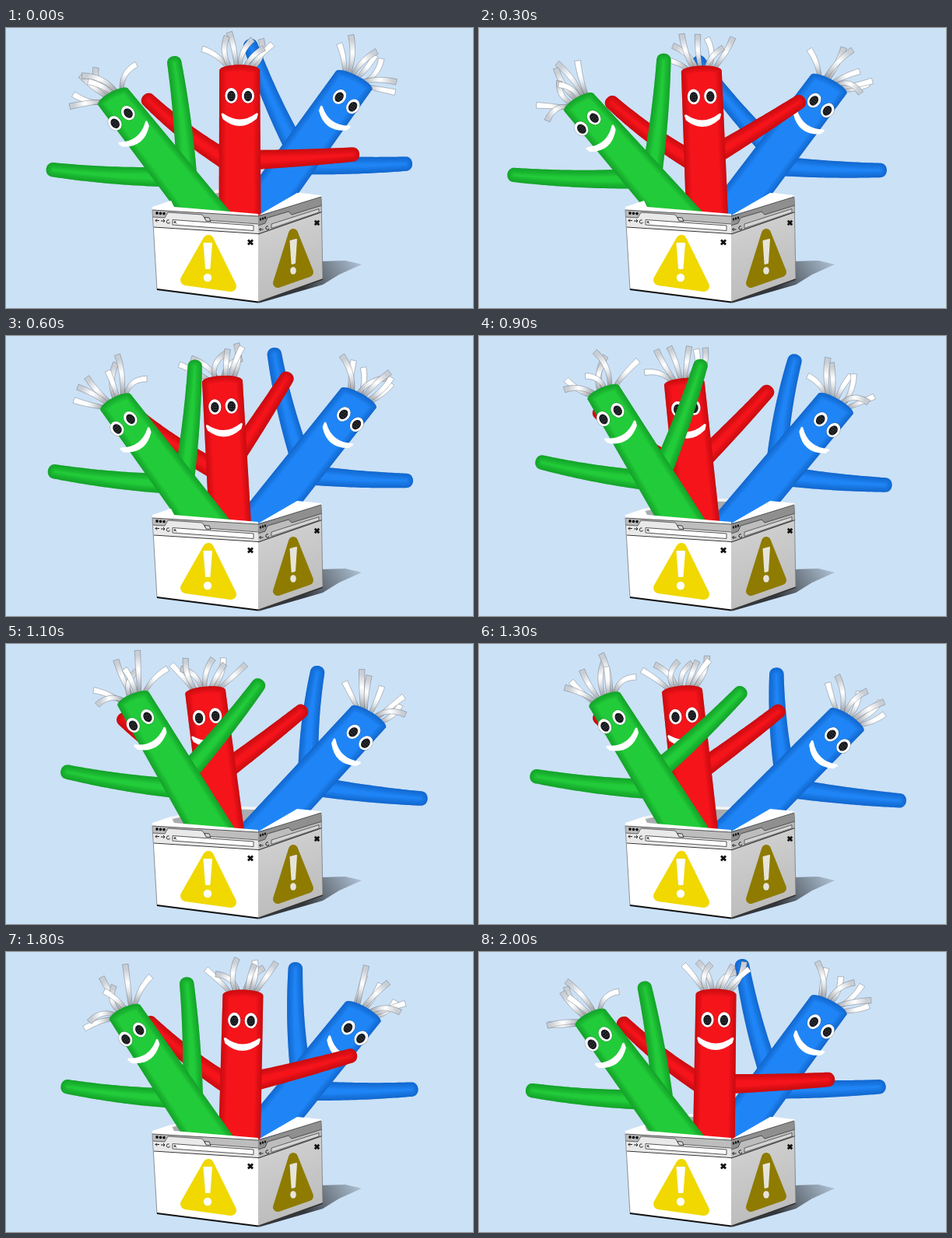
An HTML page with a canvas for the animation above (2100 ms loop, 600 px wide and 360 px high).

```html
<!DOCTYPE html>
<html lang="en">
<head>
<meta charset="utf-8">
<title>Tube dancers in a browser box</title>
<style>
  html, body { margin: 0; width: 100%; height: 100%; overflow: hidden; background: #cbe1f6; }
  canvas { display: block; }
</style>
</head>
<body>
<canvas id="stage" width="600" height="360"></canvas>
<script>
const ctx = document.getElementById('stage').getContext('2d');
const LOOP = 2100, STEP = 100, FLOOR = 240;
const { sin, cos, PI } = Math;
const rad = deg => deg * PI / 180;
const mix = (a, b, t) => a + (b - a) * t;

// A swing that repeats once per loop, plus an overtone
const wave = (mid, c1 = 0, s1 = 0, c2 = 0, s2 = 0) => q =>
  mid + c1 * cos(q) + s1 * sin(q) + c2 * cos(2 * q) + s2 * sin(2 * q);

// Angles are degrees clockwise from straight up.
// Arms: joint is the height along the body, side the offset from its middle,
// slide lifts the joint as the arm lowers.
const blue = {
  color: '#1f85f6', dark: '#07419c', headW: 26, baseW: 27, seed: 5,
  base: wave(327, -4, -2), height: wave(208, 7), lean: wave(39.7, -3.1, -2.6, -1, 1),
  arms: [
    { joint: 100, side: -14, bend: -3, angle: wave(-10.5, -15.7, -9.2, 3, -11.6), reach: wave(139, 9, 5) },
    { joint: 80, side: 0, bend: 2, angle: wave(93, -3.3, 0.3, 0, 1.4), reach: wave(154, -1.5, -5, 0, 4) }]
};
const red = {
  color: '#f6141b', dark: '#8e0008', headW: 26, baseW: 27, seed: 31,
  base: wave(290, 10.5, -1, 0, -2.8), height: wave(185, 3), lean: wave(-2.8, 3.5, -0.8, -0.8, -1.2),
  arms: [
    { joint: 60, side: 0, bend: -5, angle: wave(-54, 1, -1.5), reach: wave(155) },
    { joint: 70, side: 0, bend: 1, angle: wave(58, 18, -11, 11), reach: wave(150, 4, -2) }]
};
const green = {
  color: '#22cb39', dark: '#08701a', headW: 22, baseW: 27, seed: 72,
  base: wave(260.5, -3.3, -4.4), height: wave(197, -2, -2), lean: wave(-35, -3.8, -2.8, 0.6, -1.5),
  arms: [
    { joint: 62, side: 0, bend: -3, angle: wave(-84.3, -2.7, -0.6, 0.5, -1.8), reach: wave(166, 2.5, 3.8, -1, 7.3) },
    { joint: 62, side: 14, bend: 2, slide: 0.5, angle: wave(14, -20.5, -8.6, 0, 11.5), reach: wave(150) }]
};

const random = n => {
  const x = sin(n * 12.9898) * 43758.5453;
  return x - Math.floor(x);
};

// Step from a point: along an angle and to its right
function move(p, deg, far, side = 0) {
  const a = rad(deg);
  return [p[0] + sin(a) * far + cos(a) * side, p[1] - cos(a) * far + sin(a) * side];
}

function trace(points) {
  ctx.beginPath();
  points.forEach(p => ctx.lineTo(p[0], p[1]));
}

function stroke(color, width) {
  ctx.strokeStyle = color;
  ctx.lineWidth = width;
  ctx.stroke();
}

function poly(points, fill, edge, width = 1) {
  trace(points);
  ctx.closePath();
  ctx.fillStyle = fill;
  ctx.fill();
  if (edge) stroke(edge, width);
}

function line(points, color, width) {
  trace(points);
  stroke(color, width);
}

function oval(x, y, rx, ry, fill) {
  ctx.beginPath();
  ctx.ellipse(x, y, rx, ry, 0, 0, 7);
  ctx.fillStyle = fill;
  ctx.fill();
}

// Outline of a band along a quadratic curve; width depends on the way along it
function band(a, c, b, width, steps) {
  const left = [], right = [];
  for (let i = 0; i <= steps; i++) {
    const s = (i / steps) ** 1.6;
    const at = k => mix(mix(a[k], c[k], s), mix(c[k], b[k], s), s);
    const dx = mix(c[0] - a[0], b[0] - c[0], s), dy = mix(c[1] - a[1], b[1] - c[1], s);
    const w = width(s) / (Math.hypot(dx, dy) || 1);
    left.push([at(0) - dy * w, at(1) + dx * w]);
    right.unshift([at(0) + dy * w, at(1) - dx * w]);
  }
  return left.concat(right);
}

// Fill the current path and darken it softly toward its edges
function inflate(fig) {
  ctx.save();
  ctx.fillStyle = fig.color;
  ctx.fill();
  ctx.clip();
  ctx.globalAlpha = 0.09;
  for (let w = 2; w < 18; w += 3) stroke(fig.dark, w);
  ctx.restore();
}

function drawArm(fig, arm, foot, lean, q) {
  const angle = arm.angle(q), reach = arm.reach(q);
  const joint = move(foot, lean, arm.joint + (arm.slide || 0) * angle, arm.side);
  const tip = move(joint, angle, reach);
  const width = s => {
    const d = Math.min(1, s * reach / 9);
    return mix(9, 13, s) * Math.sqrt(1 - (1 - d) ** 2.4);
  };
  trace(band(tip, move(joint, angle, reach / 2, 2 * arm.bend), joint, width, 40));
  ctx.closePath();
  inflate(fig);
}

function drawBody(fig, foot, head, lean) {
  const tilt = lean * 0.75, flare = fig.baseW / cos(rad(lean));
  const corner = (side, up) => move(head, tilt, up, side * fig.headW);
  const low = move(foot, lean, -10);
  ctx.beginPath();
  ctx.moveTo(low[0] - flare, low[1]);
  ctx.lineTo(...corner(-1, -2));
  ctx.bezierCurveTo(...corner(-0.9, 7), ...corner(0.9, 7), ...corner(1, -2));
  ctx.lineTo(low[0] + flare, low[1]);
  ctx.closePath();
  inflate(fig);
}

function drawHair(fig, head, lean, q) {
  const count = 7;
  for (let k = 0; k < count; k++) {
    const i = k * 3 % count, slot = i - (count - 1) / 2;
    const rnd = n => random(fig.seed + i * 7 + n);
    const angle = lean + 14 * slot + lean * 0.4 * cos(q) + 12 * sin(2 * q + 6 * rnd(1));
    const len = 36 + 18 * rnd(2);
    const curl = (rnd(3) - 0.5) * 110 + 35 * sin(3 * q + 6 * rnd(4));
    const root = move(head, lean * 0.75, -4, slot * 4);
    const ctrl = move(root, angle, len * 0.6);
    const tip = move(ctrl, angle + curl, len * 0.55);
    const g = ctx.createLinearGradient(...root, ...tip);
    g.addColorStop(0, '#7f858c');
    g.addColorStop(0.45, '#e6e9ec');
    g.addColorStop(0.6, '#fff');
    g.addColorStop(0.9, rnd(5) > 0.5 ? '#fff' : '#c9ced4');
    poly(band(root, ctrl, tip, s => 2.4 + 1.4 * s, 12), g, 'rgba(50,56,66,.5)', 0.6);
  }
}

function drawFace(x, y, lean) {
  ctx.save();
  ctx.translate(x, y);
  ctx.rotate(rad(lean));
  for (const eye of [-10.7, 10.7]) {
    oval(eye, 0, 8.6, 10.4, 'rgba(0,0,0,.3)');
    oval(eye, 0, 8.1, 9.9, '#fff');
    oval(eye, 0.5, 5.2, 6.7, '#17191c');
    for (let i = 0; i < 9; i++)
      oval(eye + (i % 3 - 1) * 2.4, 0.5 + (Math.floor(i / 3) - 1) * 3, 0.5, 0.5, '#6c7075');
  }
  ctx.beginPath();
  ctx.moveTo(-22, 24);
  ctx.quadraticCurveTo(0, 40, 22, 24);
  ctx.lineTo(20.5, 29);
  ctx.quadraticCurveTo(0, 46, -20.5, 29);
  ctx.closePath();
  ctx.fillStyle = '#fff';
  ctx.fill();
  stroke('#fff', 3);
  ctx.restore();
}

function dancer(fig, q) {
  const lean = fig.lean(q), foot = [fig.base(q), FLOOR];
  const head = move(foot, lean, fig.height(q));
  drawHair(fig, head, lean, q);
  fig.arms.forEach(arm => drawArm(fig, arm, foot, lean, q));
  drawBody(fig, foot, head, lean);
  drawFace(...move(head, lean, 0.13 * Math.abs(lean) - 35, 0.23 * lean), lean);
}

function cross(x, y, s) {
  line([[x - s, y - s], [x + s, y + s]], '#111', 2.8);
  line([[x + s, y - s], [x - s, y + s]], '#111', 2.8);
}

function arrow(x, y, dir) {
  line([[x - 2.5, y], [x + 2.5, y]], '#222', 1);
  line([[x + dir * 0.5, y - 2], [x + dir * 2.5, y], [x + dir * 0.5, y + 2]], '#222', 1);
}

function reload(x, y) {
  ctx.beginPath();
  ctx.arc(x, y, 2.2, 0.3, 5.2);
  stroke('#222', 1);
}

function boxBack() {
  const g = ctx.createLinearGradient(385, 338, 450, 298);
  g.addColorStop(0, '#33373c');
  g.addColorStop(0.45, '#6f7984');
  g.addColorStop(1, '#a9bccf');
  poly([[324, 354], [407, 330], [428, 317], [457, 304], [436, 299], [404, 300]], g);
  poly([[188, 231], [212, 222], [272, 208], [375, 211], [405, 216], [324, 242]], '#f4f4f4');
  poly([[200, 231], [214, 225], [272, 212], [366, 214], [324, 239]], '#a9acb0');
}

function frontFace() {
  poly([[188, 230], [212, 222], [216, 230], [324, 239], [324, 243], [188, 235]], '#fff');
  poly([[188, 234], [324, 242], [324, 353], [194, 336]], '#fff');
  poly([[188, 234], [324, 242], [324, 253], [189, 244]], '#bdbdbd');
  const tab = [[189, 243], [204, 244], [208, 237], [252, 240], [257, 247], [324, 252]];
  poly([...tab, [324, 264], [190, 255]], '#e9e9e9');
  line(tab, '#555', 0.9);
  line([[188, 234], [324, 242]], '#555', 1);
  line([[190, 256], [324, 264.5]], '#333', 1.2);
  for (let i = 0; i < 3; i++) oval(194 + i * 4.5, 238 + i * 0.3, 1.8, 1.9, '#111');
  poly([[255, 243.5], [261, 244], [263, 248.5], [257, 248]], '#ddd', '#333', 0.9);
  arrow(194.5, 247.5, -1);
  arrow(201.5, 248, 1);
  reload(208.5, 249);
  poly([[214, 246.5], [318, 254], [318, 260.5], [214, 253]], '#fff', '#444', 0.9);
  oval(217, 249.5, 1.5, 1.5, '#555');
  line([[217.5, 250], [219.5, 252]], '#555', 0.8);
  cross(314, 275.5, 3);
}

function sideFace() {
  const g = ctx.createLinearGradient(340, 240, 375, 340);
  g.addColorStop(0, '#d2d2d2');
  g.addColorStop(1, '#bcbcbc');
  poly([[324, 241], [374, 212], [405, 215], [406, 219]], '#fff');
  poly([[324, 242], [405, 217], [407, 323], [324, 353]], g);
  poly([[324, 242], [405, 217], [406, 228], [324, 254]], '#8f8f8f');
  const tab = [[324, 254], [333, 251], [336, 244], [363, 236], [367, 240], [406, 228]];
  poly([...tab, [406, 236], [324, 265]], '#bdbdbd');
  line(tab, '#444', 0.9);
  line([[324, 242], [405, 217]], '#555', 1);
  line([[324, 265], [406, 236.5]], '#333', 1.1);
  for (let i = 0; i < 3; i++) oval(327 + i * 3, 246 - i, 1.2, 1.7, '#111');
  arrow(328, 259, -1);
  reload(336, 257);
  poly([[341, 252], [402, 232.5], [402, 237], [341, 257.5]], '#d4d4d4', '#444', 0.8);
  cross(399.5, 250.5, 2.7);
}

function warning(triangle, bar, dot, color, mark, round) {
  poly(triangle, color, color, round);
  poly(bar, mark, mark, 2);
  oval(...dot, mark);
}

function boxFront() {
  frontFace();
  sideFace();
  line([[188, 234], [194, 336]], '#777', 0.8);
  line([[405, 217], [407, 323]], '#777', 0.8);
  line([[194, 336], [324, 352.5]], '#111', 1.8);
  line([[324, 352.5], [407, 323]], '#333', 1.8);
  warning([[260, 273], [231, 324], [289, 332]],
    [[254.5, 277], [264, 277], [261.5, 309], [257, 309]], [259, 321, 5.2, 5.2], '#f0d800', '#fff', 14);
  warning([[369, 264], [349, 328], [389, 314]],
    [[365.5, 274], [373, 272], [371, 302], [367.5, 303]], [369, 312, 3.8, 4.8], '#8e7b00', '#e6e4da', 12);
}

function draw(t) {
  const q = 2 * PI * t / LOOP;
  ctx.fillStyle = '#cbe1f6';
  ctx.fillRect(0, 0, 600, 360);
  ctx.lineJoin = 'round';
  boxBack();
  [blue, red, green].forEach(fig => dancer(fig, q));
  boxFront();
}

function tick() {
  const t = performance.now() % LOOP;
  draw(Math.floor(t / STEP) * STEP);
  requestAnimationFrame(tick);
}
tick();
</script>
</body>
</html>
```
